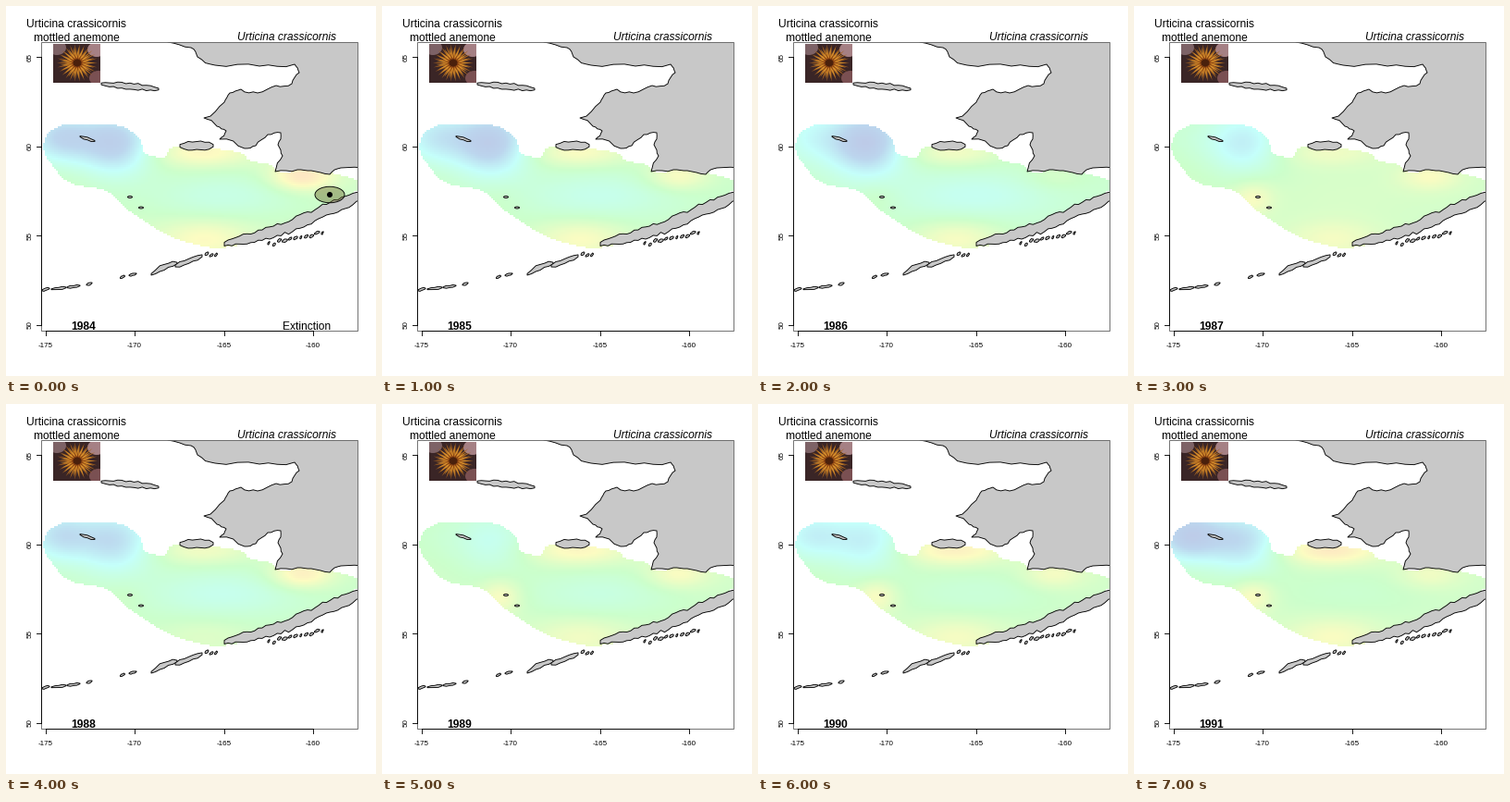
Write a matplotlib script that moves like this. It is 400 by 400 pixels and loops after 8000 ms.

```python
import numpy as np
import matplotlib.pyplot as plt
from matplotlib.animation import FuncAnimation
from matplotlib.colors import LinearSegmentedColormap
from matplotlib.patches import Circle, Ellipse, Polygon, Rectangle
from matplotlib.path import Path

SIZE, DPI = 400, 100
PX = 72 / DPI
THIN = 0.9 * PX
YEARS = range(1984, 1992)
LEFT, RIGHT, TOP, BOTTOM = 38, 380, 39, 350.5

rng = np.random.default_rng(4)
fig = plt.figure(figsize=(SIZE / DPI, SIZE / DPI), dpi=DPI, facecolor="white")
ax = fig.add_axes([0, 0, 1, 1])
ax.set_xlim(0, SIZE)
ax.set_ylim(SIZE, 0)
ax.axis("off")


def label(x, y, text, size=12, **kw):
    kw = {"ha": "center", "va": "baseline", "zorder": 8, **kw}
    return ax.text(x, y, text, fontsize=size * PX, family="Liberation Sans", **kw)


def line(xs, ys):
    ax.plot(xs, ys, color="black", lw=THIN, zorder=7)


def interleave(a, b):
    return np.stack([a, b], 1).reshape(-1, 2)


def smooth(points, rounds=3):
    """Cut the corners of a closed outline."""
    p = np.array(points, float)
    for _ in range(rounds):
        q = np.roll(p, -1, axis=0)
        p = interleave(0.8 * p + 0.2 * q, 0.2 * p + 0.8 * q)
    return p


def rough(points, amount=0.13, rounds=2):
    """Push the middle of every side in or out, like a coastline."""
    p = np.array(points, float)
    for _ in range(rounds):
        side = np.roll(p, -1, axis=0) - p
        push = rng.uniform(-amount, amount, (len(p), 1))
        p = interleave(p, p + side / 2 + side[:, ::-1] * [1, -1] * push)
    return p


def strip(points, half, noise=0.35):
    """Long thin island along a centre line, pointed at both ends."""
    xs, ys = np.array(points, float).T
    x = np.linspace(xs[0], xs[-1], max(5, int((xs[-1] - xs[0]) / 4)))
    y = np.interp(x, xs, ys)
    taper = half * np.sin(np.linspace(0.05, np.pi - 0.05, len(x))) ** 0.4
    up, down = taper * (1 + noise * rng.uniform(-1, 1, (2, len(x))))
    return np.r_[np.c_[x, y - up], np.c_[x, y + down][::-1]]


# --- temperature field -------------------------------------------------
REGION = [(39, 158), (43, 138), (62, 127), (122, 127), (147, 143), (147, 159),
          (172, 166), (178, 150), (256, 157), (262, 168), (284, 170), (300, 183),
          (320, 174), (382, 187), (382, 200), (300, 240), (236, 265), (180, 252),
          (130, 220), (110, 198), (66, 193)]
# Warm and cold centres: x, y, reach in x, reach in y
CENTRES = np.array([(58, 142, 26, 20), (118, 148, 28, 24), (235, 205, 60, 18),
                    (212, 158, 38, 11), (320, 184, 24, 11), (215, 252, 36, 15),
                    (128, 208, 16, 13)])
# Base level, then the strength of each centre
CLIMATE = {
    1984: [63, -40, -48, -14, 20, 32, 18, 0],
    1986: [58, -16, -50, -14, 18, 8, 20, 6],
    1987: [63, -6, -30, 2, 12, 16, 14, 16],
    1988: [61, -34, -36, -15, 15, 28, 7, 4],
    1989: [63, -4, -18, -12, 20, 18, 13, 18],
    1991: [63, -50, -38, -5, 27, 13, 16, 18],
}
for y in (1985, 1990):
    CLIMATE[y] = np.mean([CLIMATE[y - 1], CLIMATE[y + 1]], axis=0)

PASTEL = LinearSegmentedColormap.from_list(
    "pastel", ["#bec6e6", "#bcd6ee", "#c5fffb", "#ccffcc", "#fcfcc2", "#ffdac4"])
CELL = 2
Y0, Y1 = 124, 268
gx, gy = np.meshgrid(np.arange(LEFT, RIGHT, CELL) + CELL / 2,
                     np.arange(Y0, Y1, CELL) + CELL / 2)
inside = Path(smooth(REGION)).contains_points(
    np.c_[gx.ravel(), gy.ravel()]).reshape(gx.shape)
cx, cy, rx, ry = CENTRES.T
bumps = np.exp(-(((gx[..., None] - cx) / rx) ** 2
                 + ((gy[..., None] - cy) / ry) ** 2) / 2)


def field(year):
    base, *strength = CLIMATE[year]
    warmth = base + bumps @ np.array(strength)
    rgba = PASTEL(warmth / 100)
    rgba[..., 3] = inside
    return rgba


fields = [field(y) for y in YEARS]
sea = ax.imshow(fields[0], extent=(LEFT, RIGHT, Y1, Y0), aspect="auto",
                interpolation="nearest", zorder=1)
ax.set_xlim(0, SIZE)
ax.set_ylim(SIZE, 0)

# --- land --------------------------------------------------------------
box = ax.add_patch(Rectangle((LEFT, TOP), RIGHT - LEFT, BOTTOM - TOP, fill=False,
                             edgecolor="#666666", lw=THIN, zorder=7))


def land(outline):
    patch = ax.add_patch(Polygon(outline, facecolor="#c8c8c8", edgecolor="black",
                                 lw=THIN, joinstyle="round", zorder=3))
    patch.set_clip_path(box)


MAINLAND = [(165, -20), (175, 39), (200, 45), (207, 55), (226, 64), (274, 65),
            (312, 63), (317, 72), (309, 84), (292, 86), (272, 94), (254, 90),
            (242, 94), (236, 104), (214, 121), (228, 130), (238, 135), (231, 144),
            (258, 154), (270, 151), (283, 139), (297, 137), (294, 150), (299, 162),
            (291, 179), (315, 177), (330, 178), (350, 182), (362, 175), (420, 171),
            (420, -20)]
land(rough(MAINLAND))
land(strip([(236, 257), (270, 249), (305, 239), (345, 221), (420, 190)], 6.5, 0.3))
land(strip([(103, 84), (140, 87), (165, 90)], 3))
land(strip([(188, 151), (224, 151)], 4.5, 0.25))
land(strip([(80, 141), (96, 146)], 1.5))
land(strip([(157, 290), (170, 282), (185, 278)], 3))
land(strip([(183, 281), (212, 270)], 3))
for x, y in [(134, 206.5), (146, 218)]:
    land(strip([(x - 2.5, y), (x + 2.5, y)], 1, 0))

# Island arc trailing off to the west
for x, width in [(43, 8), (57, 16), (73, 14), (90, 6), (126, 5), (137, 8)]:
    y = 306.5 - 0.017 * max(x - 40, 0) ** 1.5
    land(strip([(x - width / 2, y + 1), (x + width / 2, y - 1)], 1.3))
# Islets off the peninsula
for x in np.r_[217:227:3j, 284:342:11j]:
    y = 267 if x < 250 else 258 - 0.21 * (x - 284)
    y += rng.uniform(-2.5, 2.5)
    width = rng.uniform(2, 6)
    land(strip([(x - width / 2, y + 1), (x + width / 2, y - 1)], 1.4))

# --- anemone picture ---------------------------------------------------
photo = ax.add_patch(Rectangle((51, 41), 50.5, 42, color="#3a2526", lw=0, zorder=4))
for x, y, color in [(55, 45, "#7d6266"), (98, 47, "#a58084"), (100, 78, "#7a5052")]:
    corner = ax.add_patch(Ellipse((x, y), 20, 16, color=color, lw=0, zorder=4))
    corner.set_clip_path(photo)


def star(outer, inner, spikes, color):
    a = np.arange(2 * spikes) * np.pi / spikes
    r = np.where(np.arange(2 * spikes) % 2, inner, outer)
    ax.add_patch(Polygon(np.c_[77 + r * np.cos(a), 61.5 + 0.92 * r * np.sin(a)],
                         color=color, lw=0, zorder=5))


star(22, 10, 26, "#a8641f")
star(19, 7, 21, "#d8922e")
star(12, 5, 17, "#8a4212")
star(5, 4, 12, "#4a200c")

# --- axes and captions -------------------------------------------------
lon_x = 42.5 + 96.5 * np.arange(4)
lat_y = 344.8 - 96.6 * np.arange(4)
line(lon_x[[0, -1]], [BOTTOM, BOTTOM])
line([LEFT, LEFT], lat_y[[0, -1]])
for i, (x, y) in enumerate(zip(lon_x, lat_y)):
    line([x, x], [BOTTOM, BOTTOM + 5.5])
    label(x, 369, str(-175 + 5 * i), 8)
    line([LEFT - 5, LEFT], [y, y])
    label(26, y, str(50 + 5 * i), 8, rotation=90, va="center")

label(76, 23, "Urticina crassicornis")
label(76, 38, "mottled anemone")
label(303, 37, "Urticina crassicornis", style="italic")
year_text = label(84, 350, "", weight="bold")

event = [
    label(325, 350, "Extinction"),
    ax.add_patch(Ellipse((350, 204), 32, 17.5, facecolor=(0.42, 0.42, 0.2, 0.45),
                         edgecolor="black", lw=THIN, zorder=8)),
    ax.add_patch(Circle((350, 204), 3, color="black", lw=0, zorder=9)),
]


def draw(i):
    sea.set_data(fields[i])
    year_text.set_text(str(YEARS[i]))
    for part in event:
        part.set_visible(i == 0)
    return [sea, year_text, *event]


anim = FuncAnimation(fig, draw, frames=len(YEARS), interval=1000, repeat=True)
plt.show()
```
